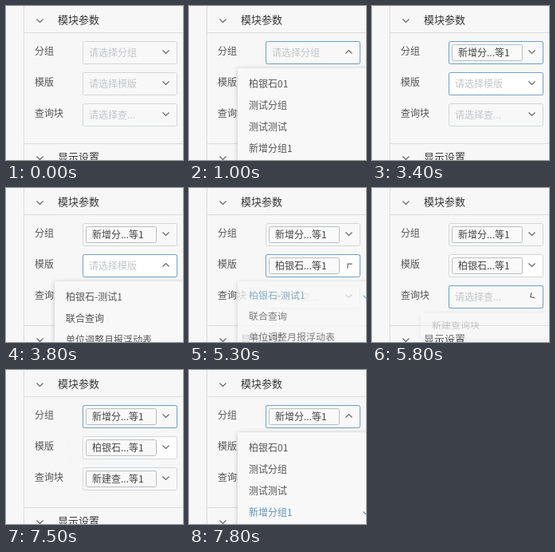
An HTML page for the animation above (8000 ms loop, 222 by 193 pixels).

```html
<!DOCTYPE html>
<html lang="zh-CN">
<head>
<meta charset="utf-8">
<style>
  html, body { margin: 0; width: 100%; height: 100%; overflow: hidden; background: #f7f7f7; }
  svg { display: block; width: 222px; height: 193px; font: 12px "Noto Sans CJK SC", "Noto Sans CJK", sans-serif; }
  text { fill: #555; }
  .title { font-size: 13px; fill: #333; }
  .line { stroke: #dcdcdc; }
  .chevron { fill: none; stroke: #666; stroke-width: 1.2; }
  .box { fill: #f8f8f8; stroke: #d3d6da; }
  .focus { fill: none; stroke: #6f9fc3; }
  .hint { fill: #c3c5c9; }
  .tag rect { fill: #f9f9f9; stroke: #b9bcc0; }
  .tag text { fill: #444; }
  .menu { filter: drop-shadow(0 1px 3px rgba(0, 0, 0, .22)); }
  .menu rect { fill: #f8f8f8; }
  .picked { fill: #5f97ba; }
  .check { fill: none; stroke: #5f97ba; stroke-width: 1.2; }
</style>
</head>
<body>
<svg id="stage" viewBox="0 0 222 193"></svg>
<script>
const LOOP = 8000, ROW = 39, ITEM = 27;

// open and focus hold [start, end] times in ms
const selects = [
  { label: '分组', hint: '请选择分组', tag: '新增分...等1',
    items: ['柏银石01', '测试分组', '测试测试', '新增分组1'], pick: 3, pickAt: 2300,
    open: [[670, 2940], [7490, 9000]], focus: [[250, 3450], [6880, 9000]] },
  { label: '模版', hint: '请选择模版', tag: '柏银石...等1',
    items: ['柏银石-测试1', '联合查询', '单位调整月报浮动表'], pick: 0, pickAt: 4500,
    open: [[3490, 5205]], focus: [[3250, 5600]] },
  { label: '查询块', hint: '请选择查...', tag: '新建查...等1',
    items: ['新建查询块'], pick: 0, pickAt: 6400,
    open: [[5690, 6630]], focus: [[5500, 6900]] },
];

const stage = document.getElementById('stage');

function add(parent, tag, attrs = {}, text = '') {
  const el = document.createElementNS('http://www.w3.org/2000/svg', tag);
  for (const key in attrs) el.setAttribute(key, attrs[key]);
  el.textContent = text;
  return parent.appendChild(el);
}
const label = (parent, x, y, text, cls = '') => add(parent, 'text', { x, y, class: cls }, text);
const rect = (parent, x, y, width, height, cls = '') =>
  add(parent, 'rect', { x, y, width, height, rx: 2, class: cls });
const chevron = (parent, x, y) =>
  add(add(parent, 'g', { transform: `translate(${x} ${y})` }), 'path', { d: 'M-4-2 0 2 4-2', class: 'chevron' });

function header(y, text) {
  chevron(stage, 42.5, y + 1.5);
  label(stage, 65, y + 4.5, text, 'title');
}

add(stage, 'path', { d: 'M22.5 0V193M22 33.5H222M22 172.5H222', class: 'line' });
header(17, '模块参数');
header(189, '显示设置');

selects.forEach((s, i) => {
  const y = i * ROW;
  label(stage, 36, y + 60.5, s.label);
  s.box = rect(stage, 96.5, y + 44.5, 118, 28, 'box');
  s.ring = rect(stage, 96.5, y + 44.5, 118, 28, 'focus');
  s.hintText = label(stage, 104, y + 63, s.hint, 'hint');
  s.tagGroup = add(stage, 'g', { class: 'tag' });
  rect(s.tagGroup, 100.5, y + 48.5, 88, 20);
  label(s.tagGroup, 108, y + 63, s.tag);
  s.arrow = chevron(stage, 200.5, y + 57.5);
});

selects.forEach((s, i) => {
  const top = 78 + i * ROW;
  s.top = top;
  s.menu = add(stage, 'g', { class: 'menu' });
  rect(s.menu, 61, top, 180, s.items.length * ITEM + 11);
  s.rows = s.items.map((text, n) => label(s.menu, 75, top + 23.5 + n * ITEM, text));
  s.check = add(s.menu, 'path', { d: `M218.5 ${top + 18.5 + s.pick * ITEM}l3 3 6-6`, class: 'check' });
});

function ease(x) {
  x = Math.min(1, Math.max(0, x));
  return x * x * (3 - 2 * x);
}
const level = (t, spans, ms) =>
  Math.max(...spans.map(([a, b]) => Math.min(ease((t - a) / ms), 1 - ease((t - b) / ms))));
const show = (el, on) => el.setAttribute('visibility', on ? 'visible' : 'hidden');

function draw(t) {
  for (const s of selects) {
    const open = level(t, s.open, 300);
    const picked = t >= s.pickAt;
    s.ring.setAttribute('opacity', level(t, s.focus, 180));
    s.arrow.setAttribute('transform', `rotate(${180 * open})`);
    show(s.hintText, !picked);
    show(s.tagGroup, picked);
    show(s.check, picked);
    s.rows[s.pick].setAttribute('class', picked ? 'picked' : '');
    s.box.style.fill = s === selects[1] && t >= 3300 ? '#fff' : '';
    s.menu.setAttribute('opacity', open);
    s.menu.setAttribute('transform',
      `translate(0 ${s.top}) scale(1 ${0.8 + 0.2 * open}) translate(0 ${-s.top})`);
  }
}

const start = performance.now();
function tick() {
  draw((performance.now() - start) % LOOP);
  requestAnimationFrame(tick);
}
tick();
</script>
</body>
</html>
```
